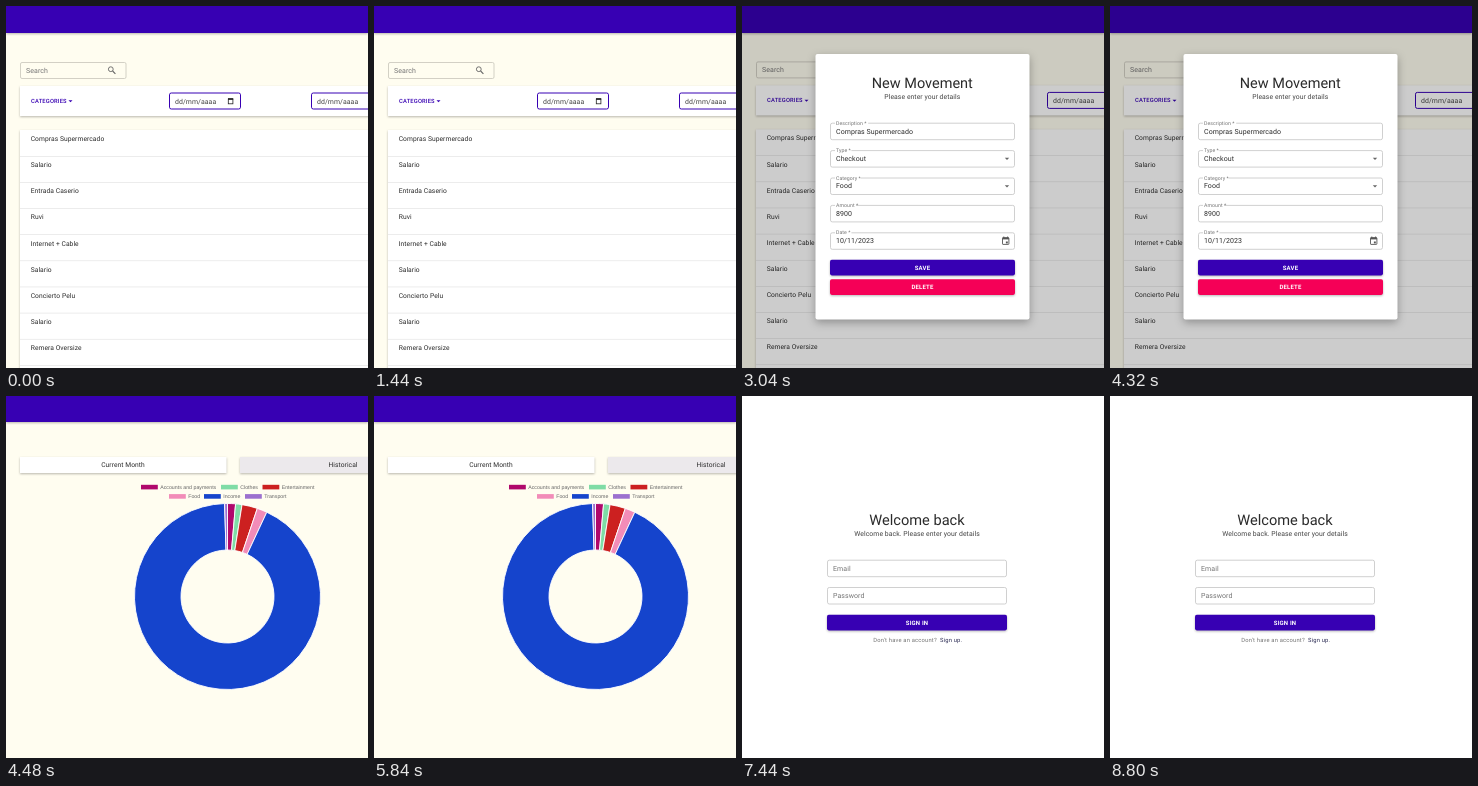
An HTML page for the animation above (8880 ms loop, 362 by 362 pixels).

```html
<!DOCTYPE html>
<html lang="en">
<head>
<meta charset="utf-8">
<title>Expense tracker tour</title>
<style>
html, body { margin: 0; height: 100%; overflow: hidden; background: #fff; }
svg { display: block; width: 100vw; height: 100vh; }
text { font-family: Roboto, Arial, sans-serif; letter-spacing: .01em; text-rendering: geometricPrecision; white-space: pre; }
.legend { font-family: "Liberation Sans", Arial, sans-serif; letter-spacing: 0; }
.caps { font-weight: 500; letter-spacing: .0286em; }
.shade { filter: drop-shadow(0 1px 1px rgba(0, 0, 0, .28)); }
</style>
</head>
<body>
<svg id="stage" viewBox="0 0 362 362"></svg>
<script>
const STEP = 80, LOOP = 8880, HOLD = LOOP / 6;
const PURPLE = '#3700b3', CREAM = '#fffdf0', INK = '#2b2b2b', GREY = '#757575';

const text = (x, y, str, size = 7, fill = INK, attrs = '') =>
  `<text x="${x}" y="${y}" font-size="${size}" fill="${fill}" ${attrs}>${str}</text>`;
const mid = (x, y, str, size, fill, attrs = '') =>
  text(x, y, str, size, fill, 'text-anchor="middle" ' + attrs);
const rect = (x, y, w, h, fill, attrs = '') =>
  `<rect x="${x}" y="${y}" width="${w}" height="${h}" fill="${fill}" ${attrs}/>`;
const path = (d, attrs) => `<path d="${d}" ${attrs}/>`;
const shade = 'class="shade"';

const page = h => rect(0, 0, 362, 362, CREAM) + rect(0, 0, 362, h, PURPLE, shade);
const arrow = (x, y, w, fill) => path(`M${x - w} ${y - w / 2}h${2 * w}l${-w} ${w}z`, `fill="${fill}"`);
const calendar = (x, y) =>
  rect(x - 3.2, y - 3, 6.4, 6.6, 'none', 'stroke="#555" stroke-width=".9" rx=".5"') +
  rect(x - 3.2, y - 3.4, 6.4, 2, '#555') + rect(x + .2, y + .7, 1.9, 1.9, '#555') +
  path(`M${x - 1.9} ${y - 4.3}v1.5M${x + 1.9} ${y - 4.3}v1.5`, 'stroke="#555" stroke-width=".9"');

// Outlined input; the label sits inside when empty and on the border when filled
function field(x, y, w, label, value, bg = '#fff') {
  const box = rect(x + .5, y + .5, w - 1, 16.5, bg, 'rx="1.8" stroke="#c4c4c4" stroke-width=".8"');
  if (value === undefined) return box + text(x + 6, y + 11.2, label, 7, GREY);
  return box + rect(x + 5, y - 1, label.length * 2.4 + 2, 3, bg) +
    text(x + 6, y + 2, label, 5.2, GREY) + text(x + 6, y + 10.8, value);
}
const button = (x, y, w, label, fill = PURPLE) =>
  rect(x, y, w, 15.6, fill, 'rx="1.8" ' + shade) +
  mid(x + w / 2, y + 9.9, label, 6, '#fff', 'class="caps" style="font-weight:700"');

const dateBox = x =>
  rect(x + .5, 87, 71, 16, '#fff', `rx="1.8" stroke="${PURPLE}"`) +
  text(x + 6, 97.8, 'dd/mm/aaaa', 6.9, '#444') +
  rect(x + 59.3, 93, 4.6, 4.8, 'none', 'stroke="#222" stroke-width=".8"') +
  rect(x + 59, 92.2, 5.2, 1.6, '#222');

const ROWS = ['Compras Supermercado', 'Salario', 'Entrada Caserio', 'Ruvi', 'Internet + Cable',
  'Salario', 'Concierto Pelu', 'Salario', 'Remera Oversize'];

const list = (dy = 0) => page(27) + `<g transform="translate(0 ${dy})">` +
  rect(14.5, 56.5, 105.5, 16, CREAM, 'rx="1.5" stroke="#c8c6ba" stroke-width=".8"') +
  text(20, 67, 'Search', 7, GREY) +
  '<circle cx="104.8" cy="63.2" r="2.4" fill="none" stroke="#666" stroke-width=".9"/>' +
  path('M106.6 65l2.8 2.8', 'stroke="#666" stroke-width="1.1"') +
  rect(14, 80, 360, 30, '#fff', shade) +
  text(25, 97, 'CATEGORIES', 5.8, PURPLE, 'class="caps"') + arrow(64.5, 95.3, 2, PURPLE) +
  dateBox(163) + dateBox(305) +
  rect(14, 124, 360, 250, '#fff', shade) +
  ROWS.map((row, i) => text(24.7, 135 + i * 26.13, row, 6.7) +
    rect(14, 150 + i * 26.13, 348, .6, '#e0e0e0')).join('') + '</g>';

function modal(top, values, extra = '') {
  const labels = ['Description *', 'Type *', 'Category *', 'Amount *', 'Date *'];
  const y = i => top + 34.5 + i * 27.4;
  return list(-.6) + rect(0, 0, 362, 362, '#000', 'opacity=".2"') +
    rect(73.5, 48, 214, 265.5, '#fff', 'rx="2" style="filter:drop-shadow(0 3px 4px rgba(0,0,0,.3))"') +
    mid(180.3, top - .3, 'New Movement', 14.5, INK, 'style="letter-spacing:0"') +
    mid(180.3, top + 11, 'Please enter your details', 6.8, '#444') +
    labels.map((label, i) => field(88, y(i), 185, label, values[i])).join('') +
    arrow(265, y(1) + 8.8, 2.2, '#666') + arrow(265, y(2) + 8.8, 2.2, '#666') +
    calendar(263.7, y(4) + 8.5) + button(88, y(5) + .1, 185, 'SAVE') + extra;
}

// name, colour, end angle in degrees, legend x, legend row
const SLICES = [
  ['Accounts and payments', '#b0086c', 5, 135, 0],
  ['Clothes', '#7fdca6', 9, 215, 0],
  ['Entertainment', '#cc2020', 18.7, 256.5, 0],
  ['Food', '#f28cb8', 25, 163, 1],
  ['Income', '#1544cc', 358.2, 198, 1],
  ['Transport', '#9c70cf', 360, 239, 1]];

function chart() {
  const at = (r, a) => {
    const t = a * Math.PI / 180;
    return `${221.5 + r * Math.sin(t)} ${200.5 - r * Math.cos(t)}`;
  };
  const R = 93, r = 46.5;
  let from = 0;
  const ring = SLICES.map(([, fill, to]) => {
    const big = +(to - from > 180);
    const d = `M${at(R, from)}A${R} ${R} 0 ${big} 1 ${at(R, to)}L${at(r, to)}A${r} ${r} 0 ${big} 0 ${at(r, from)}z`;
    from = to;
    return path(d, `fill="${fill}" stroke="#fff" stroke-width=".9"`);
  }).join('');
  const legend = SLICES.map(([name, fill, , x, row]) =>
    rect(x, 88.8 + row * 9.3, 16.8, 4.6, fill) +
    text(x + 19.2, 93 + row * 9.3, name, 5.25, '#666', 'class="legend"')).join('');
  return page(26) + rect(14, 61, 206.5, 16, '#fff', shade) + rect(234, 61, 206, 16, '#ece9ec', shade) +
    mid(117, 71.3, 'Current Month', 6.7) + mid(337, 71.3, 'Historical', 6.7) + legend + ring;
}

const profile = () => page(25) +
  `<g fill="none" stroke="#222" stroke-width="1.6"><circle cx="181.8" cy="62" r="7.3"/>
  <circle cx="181.8" cy="59.8" r="2.3"/><path d="M176.8 67q5-4.6 10 0"/></g>` +
  text(198.2, 66.5, 'Braulio Tenk', 14.8, INK, 'style="letter-spacing:0"') +
  [['Name', 'Braulio Tenk'], ['Birthday', '04/03/2000'], ['Email', 'brauliotenk10@post.test'],
    ['Phone', '']].map(([label, value], i) => field(127, 92.5 + i * 27.4, 199, label, value, CREAM)).join('') +
  calendar(316.7, 128.3) +
  rect(136.5, 181, 8.5, 5.4, '#74acdf') + rect(136.5, 182.8, 8.5, 1.8, '#fff') +
  text(152, 185.7, '+54 11 0000 1234') + button(127, 202.3, 199, 'SAVE', '#9580f5');

const login = () => rect(0, 0, 362, 362, '#fff') +
  mid(175, 129, 'Welcome back', 14.6, INK, 'style="letter-spacing:0"') +
  mid(175, 140.2, 'Welcome back. Please enter your details', 6.85, '#444') +
  field(85, 163.7, 180, 'Email') + field(85, 191, 180, 'Password') + button(85, 218.8, 180, 'SIGN IN') +
  text(131.3, 246, "Don't have an account?", 5.8, GREY, 'style="letter-spacing:.033em"') +
  text(198, 246, 'Sign up.', 5.8, '#2c2c54', 'style="letter-spacing:.033em"');

const stage = document.getElementById('stage');
stage.innerHTML = [
  list(),
  modal(92.5, [, '', , , '07/11/2023']),
  modal(82.2, ['Compras Supermercado', 'Checkout', 'Food', '8900', '10/11/2023'],
    button(88, 273.3, 185, 'DELETE', '#f50057')),
  chart(), profile(), login()
].map(s => `<g>${s}</g>`).join('');

const screens = [...stage.children];
const start = performance.now();
function draw() {
  const t = (performance.now() - start) % LOOP;
  const now = Math.floor(Math.floor(t / STEP) * STEP / HOLD);
  screens.forEach((g, i) => g.style.display = i === now ? '' : 'none');
  requestAnimationFrame(draw);
}
draw();
</script>
</body>
</html>
```
